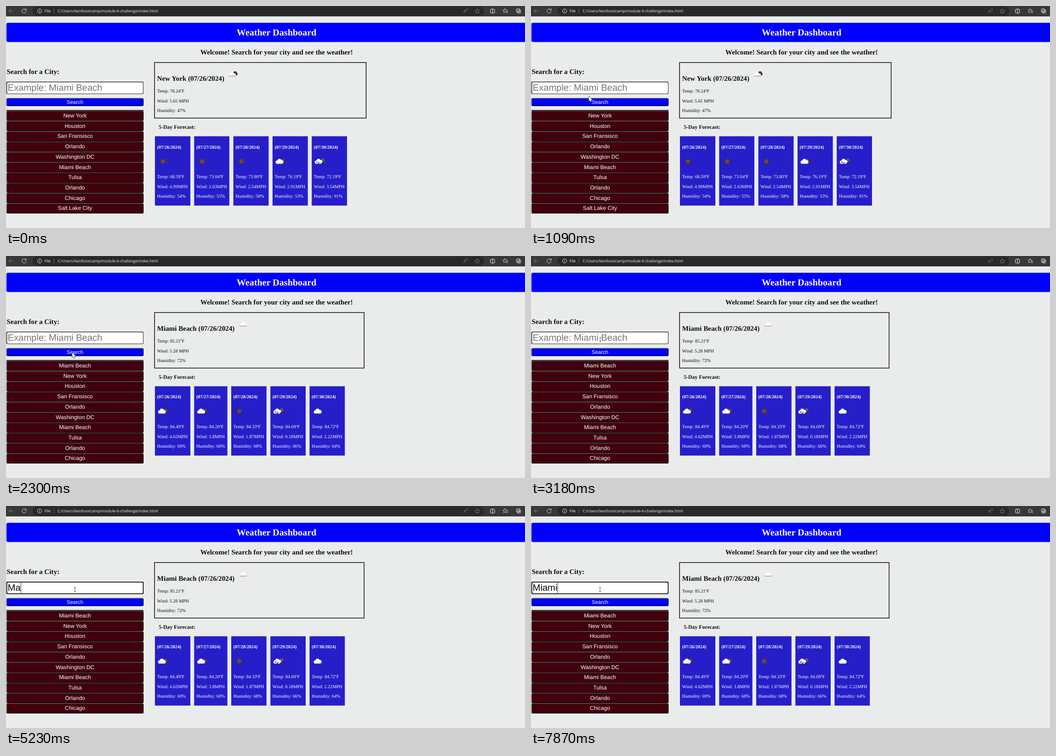
Write an HTML page with a canvas that moves like this. It is 1143 px wide and 490 px high and loops after 8 s.

```html
<!DOCTYPE html>
<html lang="en">
<head>
<meta charset="utf-8">
<title>Weather Dashboard</title>
<style>
html, body { margin: 0; width: 100%; height: 100%; overflow: hidden; background: #eaecec; }
canvas { display: block; }
</style>
</head>
<body>
<canvas id="stage" width="1143" height="490"></canvas>
<script>
const ctx = document.getElementById('stage').getContext('2d');
const LOOP = 8000;
const SERIF = '"Liberation Serif", "Times New Roman", serif';
const SANS = '"Liberation Sans", Arial, sans-serif';
const UI = '"Open Sans", "Noto Sans", sans-serif';
const H1 = 20.38, H2 = 15.29, H3 = 11.95, BODY = 10.19;

const cities = ['New York', 'Houston', 'San Fransisco', 'Orlando', 'Washington DC',
  'Miami Beach', 'Tulsa', 'Orlando', 'Chicago', 'Salt Lake City'];

const reports = [
  { city: 'New York', temp: '78.24', wind: '5.65', hum: 47, right: 793.2, icon: 489, sky: 'night',
    dateY: 314.9, iconY: 343,
    days: [
      { x: 328, w: 78, sky: 'sun', temp: '68.59', wind: '4.99', hum: 54 },
      { x: 414.4, w: 77.5, sky: 'sun', temp: '73.04', wind: '2.63', hum: 55 },
      { x: 500.7, w: 77.7, sky: 'sun', temp: '73.80', wind: '2.54', hum: 58 },
      { x: 587, w: 77.7, sky: 'dark', temp: '76.19', wind: '2.91', hum: 53 },
      { x: 673.3, w: 77.7, sky: 'rain', temp: '72.19', wind: '3.54', hum: 91 }
    ] },
  { city: 'Miami Beach', temp: '85.21', wind: '5.28', hum: 72, right: 788.6, icon: 513, sky: 'plain',
    dateY: 314.4, iconY: 342.5,
    days: [
      { x: 328, w: 78, sky: 'few', temp: '84.49', wind: '4.62', hum: 69 },
      { x: 414.4, w: 73.2, sky: 'few', temp: '84.20', wind: '3.8', hum: 68 },
      { x: 496, w: 77.7, sky: 'sun', temp: '84.33', wind: '1.87', hum: 68 },
      { x: 582.3, w: 77.7, sky: 'rain', temp: '84.69', wind: '0.18', hum: 66 },
      { x: 668.5, w: 77.7, sky: 'cloud', temp: '84.72', wind: '2.22', hum: 64 }
    ] }
];

// [start, end, steps, from, to]
const moves = [
  [190, 950, 12, [868, 454], [124.6, 226.3]],
  [1020, 1090, 2, [124.6, 226.3], [127.4, 199.3]],
  [1290, 1500, 4, [127.4, 199.3], [145.8, 213]],
  [2760, 3180, 7, [145.8, 213], [152.5, 184.5]],
  [4050, 4120, 2, [152.5, 184.5], [152, 184.5]]
];

// [time, typed text, caret shown]
const typing = [
  [0, '', 0], [3580, '', 1], [4120, '', 0], [4720, '', 1], [5100, 'M', 1], [5230, 'Ma', 1],
  [5760, 'Ma', 0], [6090, 'M', 0], [6290, '', 1], [6820, '', 0], [7080, 'M', 1],
  [7410, 'Mi', 1], [7540, 'Mia', 1], [7810, 'Miam', 1], [7870, 'Miami', 1]
];

function text(s, x, y, size, color, family = SERIF, weight = '', align = 'left') {
  ctx.font = `${weight} ${size}px ${family}`;
  ctx.textAlign = align;
  ctx.fillStyle = color;
  ctx.fillText(s, x, y);
}

function rect(x, y, w, h, color) {
  ctx.fillStyle = color;
  ctx.fillRect(x, y, w, h);
}

function round(x, y, w, h, r, color) {
  ctx.beginPath();
  ctx.roundRect(x, y, w, h, r);
  ctx.fillStyle = color;
  ctx.fill();
}

function dot(x, y, r, color) {
  ctx.beginPath();
  ctx.arc(x, y, r, 0, 7);
  ctx.fillStyle = color;
  ctx.fill();
}

function line(points, color, width = 1, close = false) {
  ctx.beginPath();
  points.forEach(([x, y]) => ctx.lineTo(x, y));
  if (close) ctx.closePath();
  ctx.strokeStyle = color;
  ctx.lineWidth = width;
  ctx.stroke();
}

function ring(x, y, r, color, a = 0, b = Math.PI * 2) {
  ctx.beginPath();
  ctx.arc(x, y, r, a, b);
  ctx.strokeStyle = color;
  ctx.lineWidth = 1;
  ctx.stroke();
}

function bevel(x, y, w, h, fill, light, dark, edge) {
  round(x, y, w, h, 3.2, dark);
  ctx.save();
  ctx.beginPath();
  ctx.moveTo(x, y + h);
  ctx.lineTo(x, y);
  ctx.lineTo(x + w, y);
  ctx.lineTo(x + w - h / 2, y + h / 2);
  ctx.lineTo(x + h / 2, y + h / 2);
  ctx.clip();
  round(x, y, w, h, 3.2, light);
  ctx.restore();
  round(x + edge, y + edge, w - 2 * edge, h - 2 * edge, 2.2, fill);
}

function star(x, y, r, color) {
  const pts = [];
  for (let i = 0; i < 10; i++) {
    const a = i * Math.PI / 5 - Math.PI / 2, d = i % 2 ? r * 0.48 : r;
    pts.push([x + d * Math.cos(a), y + d * Math.sin(a)]);
  }
  line(pts, color, 0.9, true);
}

function toolbar() {
  const on = '#e4e4e4', off = '#858585';
  rect(0, 0, 1143, 23, '#383838');
  round(58, 1, 995, 20.5, 10, '#292929');
  line([[16, 11], [6.5, 11]], off);
  line([[11, 6.8], [6.5, 11], [11, 15.2]], off);
  ring(40, 11, 4.6, on, 0.1, 5.5);
  line([[44.4, 5.8], [44.4, 9], [41.2, 9]], on);
  ring(74, 11, 4.6, on);
  line([[74, 10.2], [74, 13.6]], on);
  dot(74, 8.6, 0.7, on);
  text('File', 84.7, 14.2, 8.6, '#f4f4f4', UI);
  rect(105, 5.5, 1, 11, '#666');
  text('C:/Users/lexi/bootcamp/module-6-challenge/index.html', 113.7, 14.2, 8.56, '#f4f4f4', UI);
  text('A', 1007, 15, 9.5, off, UI);
  ring(1011, 9, 3.4, off, -0.7, 0.3);
  ring(1011, 9, 5.6, off, -0.7, 0.2);
  star(1038, 11.3, 5.4, off);
  ctx.beginPath();
  ctx.roundRect(1067, 7, 9, 8.5, 1.5);
  ctx.stroke();
  line([[1071.5, 5.8], [1071.5, 16.8]], on);
  ring(1071.5, 11.2, 0.1, on);
  ctx.beginPath();
  ctx.roundRect(1067, 7, 9, 8.5, 1.5);
  ctx.stroke();
  star(1099, 10.6, 5, on);
  rect(1101, 10.5, 5, 6, '#383838');
  line([[1101, 11.5], [1105.5, 11.5]], on);
  line([[1101.5, 14.5], [1105.5, 14.5]], on);
  ctx.beginPath();
  ctx.roundRect(1124, 6, 7.5, 7.5, 1.5);
  ctx.roundRect(1126, 8.3, 7.5, 7.5, 1.5);
  ctx.stroke();
  line([[1129.8, 10], [1129.8, 14.2]], on);
  line([[1127.7, 12.1], [1131.9, 12.1]], on);
}

function cloud(x, y, color, k = 1) {
  dot(x - 5.5 * k, y + 2 * k, 3.4 * k, color);
  dot(x - 0.5 * k, y - 0.6 * k, 4.8 * k, color);
  dot(x + 4.8 * k, y + 1.6 * k, 3.8 * k, color);
  rect(x - 5.5 * k, y + 1.4 * k, 10.5 * k, 4 * k, color);
}

// x is the left text edge of the card, y the icon middle
function weather(sky, x, y) {
  const brown = '#594034', dusk = '#383236';
  if (sky === 'sun') {
    dot(x + 13, y, 5.6, '#3c2b35');
    dot(x + 12.8, y, 4.8, '#6b4a33');
    for (const a of [-0.7, 0, 0.7])
      dot(x + 13 + 8 * Math.cos(a), y + 7 * Math.sin(a), 0.8, '#463848');
    return;
  }
  if (sky === 'few') {
    dot(x + 18.2, y - 1, 5, brown);
    dot(x + 20.3, y + 1.8, 2, dusk);
  }
  if (sky === 'dark') {
    cloud(x + 18.2, y - 1.2, dusk, 0.75);
    dot(x + 17, y - 2.8, 3, '#62564f');
  }
  if (sky === 'rain') {
    dot(x + 19.5, y - 2.2, 4.4, '#665b58');
    dot(x + 18, y + 1.8, 3.8, dusk);
  }
  const left = sky === 'dark' || sky === 'rain' ? 10.7 : sky === 'cloud' ? 13.3 : 10.8;
  cloud(x + left, y, '#d6d5dc');
  cloud(x + left, y - 0.7, '#fff', 0.92);
  if (sky === 'rain') {
    for (let i = 0; i < 4; i++)
      line([[x + 7.5 + i * 3.6, y + (i % 2) * 2], [x + 6.3 + i * 3.6, y + 3.5 + (i % 2) * 2]], '#252247', 1.7);
    dot(x + 15, y + 1, 1.7, '#fff');
  }
}

function headIcon(sky, x) {
  if (sky === 'night') {
    dot(x + 15.5, 148.3, 4.2, '#4a3a36');
    dot(x + 18.2, 150.2, 2.8, '#302c2e');
  }
  const mid = x + 9.3;
  ctx.save();
  ctx.beginPath();
  ctx.rect(x - 2, 142, 22, 13.5);
  ctx.clip();
  cloud(mid, 151.2, '#c9c6c6', 0.95);
  cloud(mid, 150.5, '#fff', 0.9);
  rect(x + 1.5, 154, 16, 1, '#8b8282');
  ctx.restore();
}

function report(r) {
  ctx.strokeStyle = '#0a0a0a';
  ctx.lineWidth = 1.5;
  ctx.strokeRect(327.2, 124.7, r.right - 327.2, 122.7);
  const ink = '#0c0c0c';
  text(`${r.city} (07/26/2024)`, 332.8, 165, H2, ink, SERIF, 'bold');
  headIcon(r.sky, r.icon);
  text(`Temp: ${r.temp}ºF`, 332.8, 190.7, BODY, ink);
  text(`Wind: ${r.wind} MPH`, 332.8, 212.5, BODY, ink);
  text(`Humidity: ${r.hum}%`, 332.8, 234.2, BODY, ink);
  text('5-Day Forecast:', 336.3, 271, H3, ink, SERIF, 'bold');
  r.days.forEach((d, i) => {
    const x = d.x + 4.8;
    rect(d.x, 287.5, d.w, 153, '#261ec9');
    text(`(07/${26 + i}/2024)`, x, r.dateY, BODY, '#fff', SERIF, 'bold');
    weather(d.sky, x, r.iconY);
    text(`Temp: ${d.temp}ºF`, x, 380, BODY, '#fff');
    text(`Wind: ${d.wind}MPH`, x, 401.6, BODY, '#fff');
    text(`Humidity: ${d.hum}%`, x, 423.4, BODY, '#fff');
  });
}

function field(t) {
  const focus = t >= 3580;
  bevel(1, 167, 302, 27.5, '#fff', '#0b0b0b', focus ? '#0b0b0b' : '#4c4c4c', focus ? 1.7 : 1.3);
  const [, typed, caret] = typing.findLast(k => t >= k[0]);
  text(typed || 'Example: Miami Beach', 3.8, 187.4, H1, typed ? '#0a0a0a' : '#757575', SANS);
  if (caret) rect(4 + ctx.measureText(typed).width, 168.5, 0.9, 23.5, '#111');
}

function sidebar(t) {
  text('Search for a City:', 1.5, 150.2, H2, '#0c0c0c', SERIF, 'bold');
  field(t);
  const edges = t >= 1900 && t < 2030 ? ['#000', '#333a66'] : ['#333a66', '#000'];
  bevel(1, 203.4, 302, 17.6, '#0000ff', ...edges, 1.3);
  text('Search', 152, 215.8, 11.47, '#fff', SANS, '', 'center');
  rect(1, 229.6, 302, 1.4, '#161616');
  const list = t < 2030 ? cities : ['Miami Beach', ...cities.slice(0, 9)];
  list.forEach((name, i) => {
    const y = 231 + i * 22.72;
    bevel(1, y, 302, 22.6, '#41000b', '#46504f', '#0c0608', 1.3);
    text(name, 152, y + 14.9, 12.23, '#fff', SANS, '', 'center');
  });
}

function pointerAt(t) {
  const m = moves.findLast(k => t >= k[0]);
  if (!m) return null;
  const [t0, t1, n, from, to] = m;
  const step = Math.min(n, 1 + Math.floor((t - t0) / (t1 - t0) * (n - 1) + 0.03));
  const k = step / n, e = k * k * (3 - 2 * k);
  return from.map((v, i) => v + (to[i] - v) * e);
}

function pointer(t) {
  const p = pointerAt(t);
  if (!p) return;
  const [x, y] = p;
  if (x < 303 && y > 167 && y < 194.5) {
    line([[x, y - 4.8], [x, y + 4.8]], '#333', 0.9);
    for (const s of [-5, 5]) line([[x - 2, y + s], [x + 2, y + s]], '#444', 0.9);
  } else {
    const arrow = [[0, 0], [0, 10.8], [2.5, 8.6], [4.2, 12.4], [5.9, 11.7], [4.3, 8.1], [7.6, 7.9]];
    line(arrow.map(([a, b]) => [x + a, y + b]), '#111', 1.1, true);
    ctx.fillStyle = '#fff';
    ctx.fill();
  }
  if (t >= 1900 && t < 2030 || t >= 3580 && t < 3720)
    dot(x + 0.2, y + 0.8, 7.2, 'rgba(255,255,0,.5)');
}

function draw(t) {
  rect(0, 0, 1143, 490, '#eaecec');
  toolbar();
  round(1, 37, 1150, 42.5, 3.5, '#0000ff');
  text('Weather Dashboard', 508, 65, H1, '#fff', SERIF, 'bold');
  text('Welcome! Search for your city and see the weather!', 428, 107, 15.32, '#0c0c0c', SERIF, 'bold');
  sidebar(t);
  report(reports[t < 2300 ? 0 : 1]);
  pointer(t);
}

function tick() {
  draw(performance.now() % LOOP);
  requestAnimationFrame(tick);
}

ctx.textRendering = 'geometricPrecision';
tick();
</script>
</body>
</html>
```
